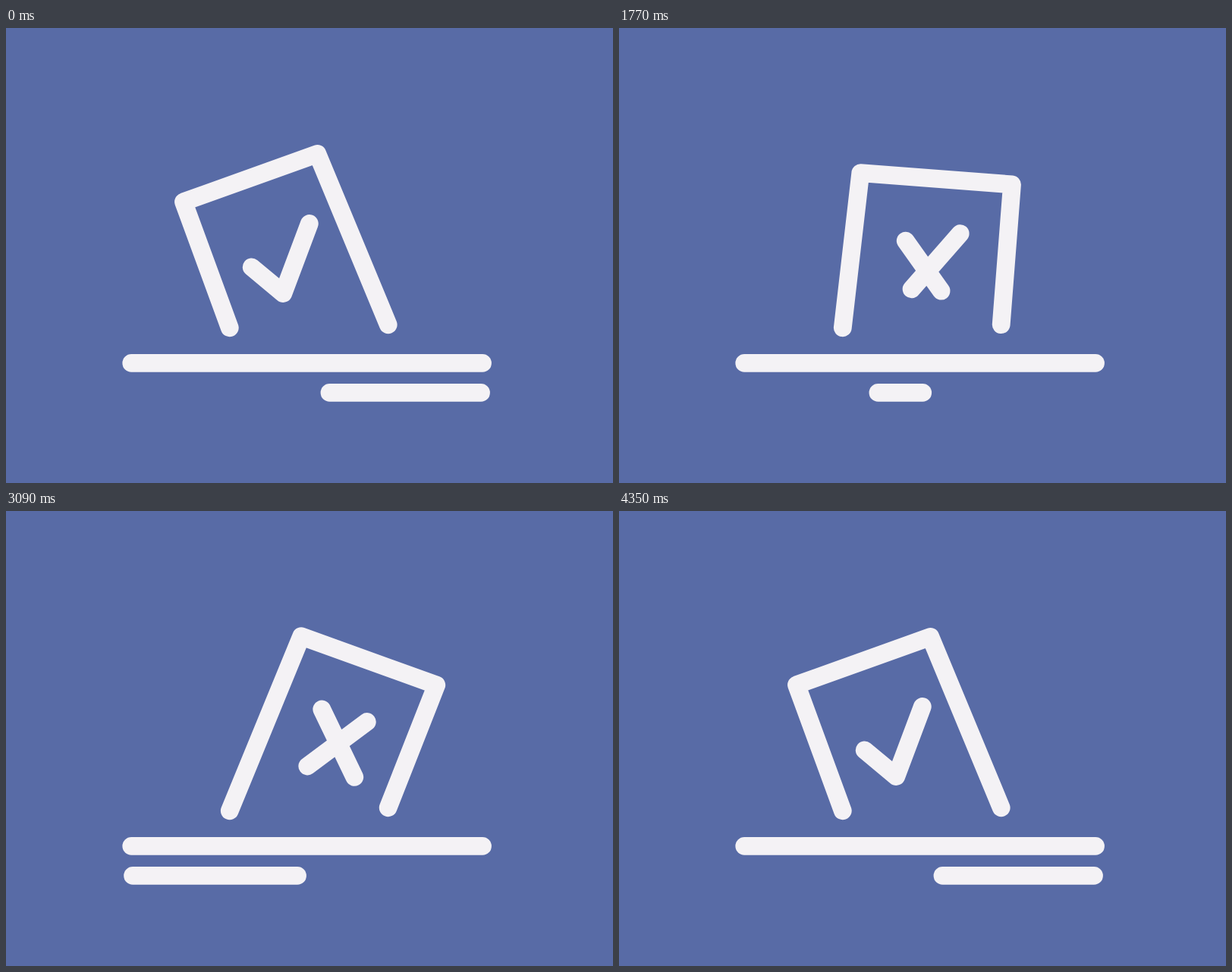
An HTML page that plays this animation: 800 by 600 pixels, repeating every 4.47 s.

```html
<!DOCTYPE html>
<html lang="en">
<head>
<meta charset="utf-8">
<title>Ballot</title>
<style>
  html, body { margin: 0; width: 100%; height: 100%; overflow: hidden; background: #586ba6; }
  svg { display: block; width: 100%; height: 100%; }
  path { fill: none; stroke: #f4f2f5; stroke-width: 23.8; stroke-linecap: round; stroke-linejoin: round; }
</style>
</head>
<body>
<svg viewBox="0 0 800 600">
  <path d="M165.3 441.9H628"/>
  <path id="paper"/>
  <path id="mark"/>
  <path id="slider"/>
</svg>
<script>
const LOOP = 4470, STEP = 30;

// A moving point passes through three places: yes, upright, no.
const track = (...places) => side => {
  const [yes, upright, no] = places;
  const end = side < 0 ? yes : no;
  return upright.map((v, i) => v + (end[i] - v) * Math.abs(side)).map(v => v.toFixed(2));
};

const tickVertex = [365.3, 350];
const paperLeft = track([234, 229.3], [292, 200.8], [389.2, 165.2]);
const paperRight = track([410.4, 166], [499.7, 197.8], [567.3, 229.5]);
const shortTop = track([323.7, 315.4], [363.4, 287.7], [416.3, 261.5]);
const shortFoot = track(tickVertex, [411.7, 345.1], [459.3, 350.9]);
const longTop = track([399.8, 258], [440, 268.5], [475.8, 278]);
const longFoot = track(tickVertex, [381.2, 347.2], [397.3, 336.5]);
const sliderEnds = track([426.5, 626], [406.2, 406.2], [167, 384]);

// The speed reached at the upright place sets how fast the move then dies away.
const SETTLED = 6.2;
function progress(t, { rise, power }) {
  if (t < rise) return (t / rise) ** power - 1;
  const decayed = Math.min((t - rise) * power / rise, SETTLED);
  return (1 - Math.exp(-decayed)) / (1 - Math.exp(-SETTLED));
}

const toNo = { sign: 1, rise: 156, power: 3.4 };
const toYes = { sign: -1, rise: 153, power: 1.85 };
const moves = [
  { start: 489, ...toNo },
  { start: 1641, ...toYes },
  { start: 2658, ...toNo },
  { start: 3658, ...toYes }
];

// -1 is the yes pose, 0 upright, 1 the no pose.
function sideAt(t) {
  const move = moves.findLast(m => m.start <= t);
  return move ? move.sign * progress(t - move.start, move) : -1;
}

const setPath = (id, d) => document.getElementById(id).setAttribute("d", d);

function draw(t) {
  const side = sideAt(t);
  const [from, to] = sliderEnds(side);
  setPath("paper", `M294.8 395.3L${paperLeft(side)}L${paperRight(side)}L503.7 391.2`);
  setPath("mark", `M${shortTop(side)}L${shortFoot(side)}M${longTop(side)}L${longFoot(side)}`);
  setPath("slider", `M${from} 480.9H${to}`);
}

const begin = performance.now();
function tick() {
  const t = (performance.now() - begin) % LOOP;
  draw(Math.floor(t / STEP) * STEP);
  requestAnimationFrame(tick);
}
tick();
</script>
</body>
</html>
```
